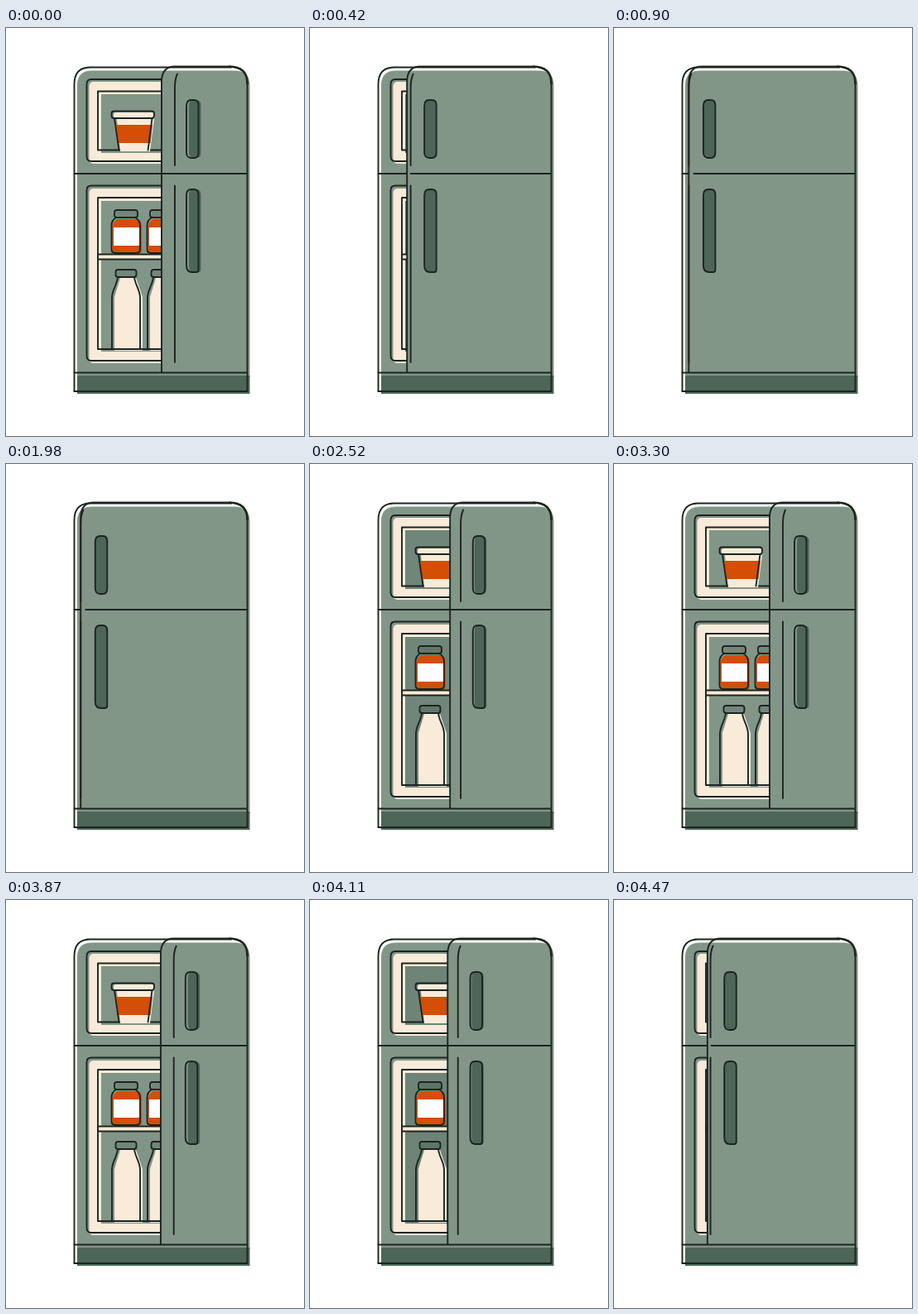
Animation of 360 by 493 pixels, one loop 4500 ms. Source, as an HTML page:

```html
<!DOCTYPE html>
<html lang="en">
<head>
<meta charset="utf-8">
<title>Fridge</title>
<style>
  /* --open: 0 = door closed, 1 = door fully open */
  @property --open { syntax: "<number>"; inherits: true; initial-value: 1; }

  html, body { margin: 0; width: 100%; height: 100%; overflow: hidden; background: #fff; }

  svg {
    --ink: #1d2420;
    --green: #829688;
    --dark: #4d6657;
    --cream: #f9ebd9;
    --ease: cubic-bezier(.364, 0, .636, 1);
    display: block;
    width: 100vw;
    height: 100vh;
    animation: swing 4500ms infinite;
  }

  @keyframes swing {
    0%      { --open: 1; animation-timing-function: var(--ease); }
    21.78%  { --open: 0; animation-timing-function: linear; }
    43.89%  { --open: 0; animation-timing-function: var(--ease); }
    67.89%  { --open: 1; animation-timing-function: linear; }
    84.56%  { --open: 1; animation-timing-function: cubic-bezier(.368, 0, .67, .639); }
    100%    { --open: .195; }
  }

  .line { fill: none; stroke: var(--ink); stroke-width: 1.9; stroke-linejoin: round; stroke-linecap: round; }
  .green { fill: var(--green); }
  .dark { fill: var(--dark); }
  .cream { fill: var(--cream); }

  /* the inside gets darker while the door closes */
  .inside {
    --light: calc(clamp(0, (var(--open) - .6) * 2.5, 1) * 100%);
    --glow: calc(clamp(0, (var(--open) - .5) * 5, 1) * 100%);
  }
  .back { fill: color-mix(in srgb, #829688 var(--light), #5c7568); }
  .lid { fill: color-mix(in srgb, #71877a var(--light), #4d6657); }
  .orange { fill: color-mix(in srgb, #d44e05 var(--glow), #4c5649); }
  .label { fill: color-mix(in srgb, #fff var(--glow), #e6dfcf); }

  /* parts of the door travel by different amounts */
  .edge { transform: translateX(calc(90px + 98px * var(--open))); }
  .crease { transform: translateX(calc(90px + 114px * var(--open))); }
  .seam { transform: translateX(calc(96px + 92px * var(--open))); }
  .handle { transform: translateX(calc(107.5px + 110.5px * var(--open))); }
  .slip { transform: translateX(calc(3px * var(--open) * var(--open))); }
</style>
</head>
<body>
<svg viewBox="0 0 360 493">
  <defs>
    <clipPath id="room"><rect x="90" y="50" width="103" height="366"/></clipPath>
    <clipPath id="door"><rect x="80" y="40" width="192" height="380"/></clipPath>

    <g id="jar">
      <rect class="lid" x="133" y="221" width="27" height="9" rx="3"/>
      <path class="orange" d="M135 231H159Q164 234 164 240V268Q164 274 158 274H135Q129 274 129 268V240Q129 234 135 231Z"/>
      <rect class="label" x="130" y="241" width="33" height="22"/>
      <rect class="line" x="131" y="220" width="28" height="9" rx="3"/>
      <path class="line" d="M133 229H156Q162 232 162 239V267Q162 272 157 272H132Q127.500 272 127.500 267V239Q127.500 232 133 229Z"/>
    </g>

    <g id="bottle">
      <path class="cream" d="M138 302H157L165 325V390H131V325Z"/>
      <rect class="lid" x="134" y="293" width="24" height="9" rx="3"/>
      <rect class="line" x="132.500" y="292" width="25" height="9" rx="3"/>
      <path class="line" d="M135 301C134 311 128 316 128 326V388M155 301C156 311 162 316 162 326V388"/>
    </g>

    <path id="grip-top" d="M0 94Q0 87 6 87H9Q14.500 87 14.500 93V151Q14.500 157 9 157H6Q0 157 0 150Z"/>
    <path id="grip-low" d="M0 202Q0 195 6 195H9Q14.500 195 14.500 201V292Q14.500 295 12 295H7Q0 295 0 287Z"/>
  </defs>

  <!-- cabinet -->
  <path class="green" d="M86 422V69Q86 51.500 104 51.500H276Q294.500 51.500 294.500 69V422Z"/>
  <rect class="dark" x="86" y="420" width="208.500" height="22"/>
  <path class="line" d="M82.500 176H190"/>

  <g class="inside" clip-path="url(#room)">
    <!-- freezer -->
    <rect class="cream" x="100.500" y="65" width="130" height="99" rx="5"/>
    <rect class="back" x="115" y="80" width="100" height="71"/>
    <path class="line" d="M200 62H103Q97.500 62 97.500 68V155Q97.500 161 103 161H200"/>
    <path class="line" d="M200 76.500H111V147.500H200"/>
    <path class="cream" d="M134 110H179L174 149H138Z"/>
    <path class="orange" d="M133.500 117H177L174.500 139H136.300Z"/>
    <rect class="cream" x="130" y="102" width="50" height="8" rx="3"/>
    <rect class="line" x="127.500" y="100.500" width="51.500" height="8.500" rx="3"/>
    <path class="line" d="M131 109L136.500 147.500M176.500 109L171.500 147.500"/>

    <!-- fridge -->
    <rect class="cream" x="100.500" y="194" width="130" height="211" rx="5"/>
    <rect class="back" x="115" y="209" width="100" height="182"/>
    <path class="line" d="M200 190.500H103Q97.500 190.500 97.500 196V396Q97.500 402 103 402H200"/>
    <path class="line" d="M200 205H111V388H200"/>
    <use href="#bottle"/>
    <use href="#bottle" x="43"/>
    <path class="line" d="M128 388H200"/>
    <rect class="cream" x="111" y="273.500" width="90" height="6"/>
    <use href="#jar"/>
    <use href="#jar" x="43"/>
    <path class="line" d="M200 273.500H111V279.500H200"/>
  </g>

  <path class="line" d="M82.500 439V68Q82.500 48 101 47.500H272"/>

  <!-- door -->
  <g clip-path="url(#door)">
    <g class="edge">
      <path class="green" d="M0 416V62Q1 54 8 52H190V416Z"/>
      <path class="line" d="M0 416V65Q0 46.500 16 46.500H190"/>
    </g>
    <path class="line seam" d="M0 176H190"/>
  </g>
  <path class="line crease" d="M3 55.500Q0 62 0 72V166M0 190.500V404"/>
  <g class="handle">
    <g class="slip">
      <use class="dark" href="#grip-top"/>
      <use class="dark" href="#grip-low"/>
    </g>
    <use class="line" href="#grip-top"/>
    <use class="line" href="#grip-low"/>
  </g>

  <path class="line" d="M270 176H291.500M82.500 416.500H291.500M291.500 66V439H82.500"/>
  <path class="line" style="stroke-width:2.6" d="M270 46.800Q291.500 46.800 291.500 67"/>
</svg>
</body>
</html>
```
